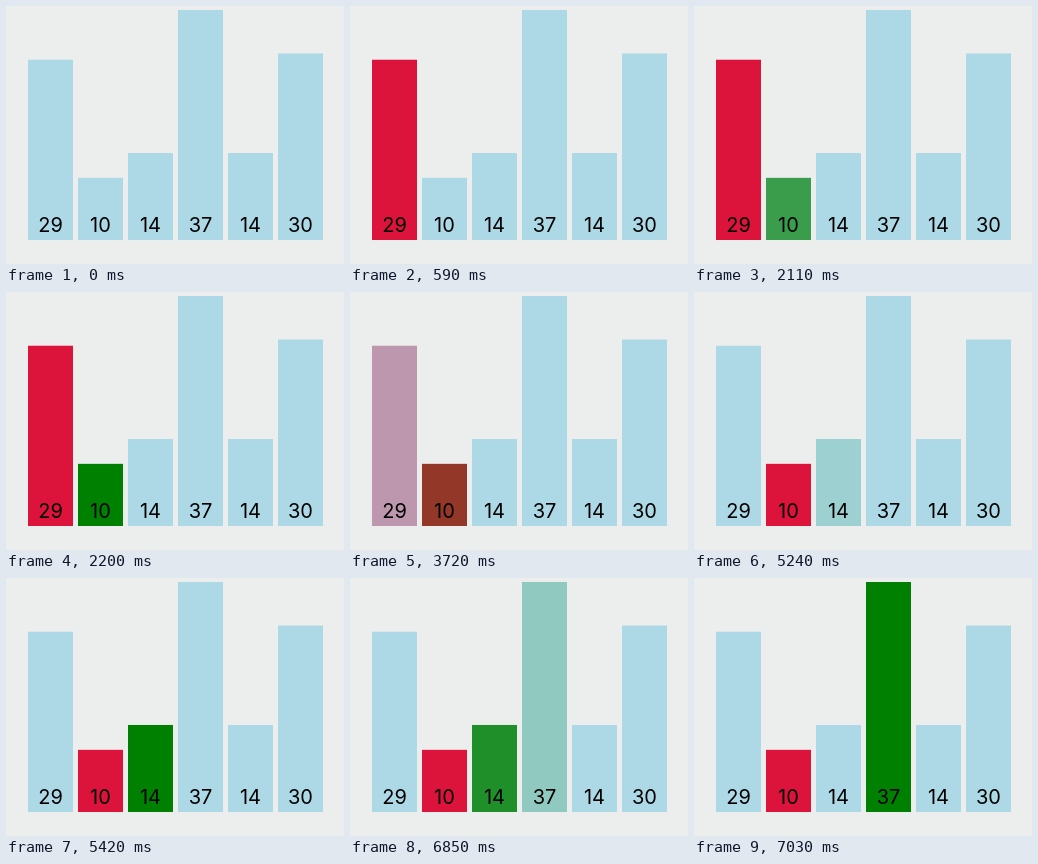
An HTML page for the animation above (8 s loop, 338x258 px).

```html
<!DOCTYPE html>
<html lang="en">
<head>
<meta charset="utf-8">
<title>Bar sort</title>
<style>
  html, body { margin: 0; width: 100%; height: 100%; overflow: hidden; background: #eceeed; }
  svg { display: block; width: 100vw; height: 100vh; }
  text { font: 400 20px Inter, "Liberation Sans", sans-serif; text-anchor: middle; fill: #000; }
</style>
</head>
<body>
<svg id="stage" viewBox="0 0 338 258"></svg>
<script>
const LOOP = 8000;
const BASE = 234;
const VALUES = [29, 10, 14, 37, 14, 30];
const UNIT = 230 / Math.max(...VALUES);
const IDLE = [173, 216, 230];
const PICK = [220, 20, 60];
const SCAN = [0, 128, 0];

// Each fade moves in steps: [time, share of the new colour].
const FADES = [
  { bar: 0, to: PICK, steps: [[500, 0.67], [590, 1]] },
  { bar: 1, to: SCAN, steps: [[2110, 0.67], [2200, 1]] },
  { bar: 0, to: IDLE, steps: [[3720, 0.67], [3800, 1]] },
  { bar: 1, to: PICK, steps: [[3720, 0.67], [3800, 1]] },
  { bar: 2, to: SCAN, steps: [[5240, 0.09], [5330, 0.82], [5420, 1]] },
  { bar: 2, to: IDLE, steps: [[6850, 0.18], [6940, 0.86], [7030, 1]] },
  { bar: 3, to: SCAN, steps: [[6850, 0.17], [6940, 0.86], [7030, 1]] }
];

const stage = document.getElementById("stage");

function add(name, attrs) {
  const node = document.createElementNS("http://www.w3.org/2000/svg", name);
  for (const key in attrs) node.setAttribute(key, attrs[key]);
  return stage.appendChild(node);
}

const bars = VALUES.map((value, i) => {
  const x = 22 + 50 * i;
  const height = value * UNIT;
  const bar = add("rect", { x, y: BASE - height, width: 45, height });
  add("text", { x: x + 22.5, y: 226 }).textContent = value;
  return bar;
});

function mix(from, to, share) {
  return from.map((c, i) => c + (to[i] - c) * share);
}

function render(time) {
  const colors = VALUES.map(() => IDLE);
  for (const { bar, to, steps } of FADES) {
    const step = steps.filter(([at]) => at <= time).pop();
    if (step) colors[bar] = mix(colors[bar], to, step[1]);
  }
  bars.forEach((bar, i) => bar.setAttribute("fill", `rgb(${colors[i].map(Math.round)})`));
}

const start = performance.now();

function tick(now) {
  render(Math.max(0, now - start) % LOOP);
  requestAnimationFrame(tick);
}

render(0);
requestAnimationFrame(tick);
</script>
</body>
</html>
```
